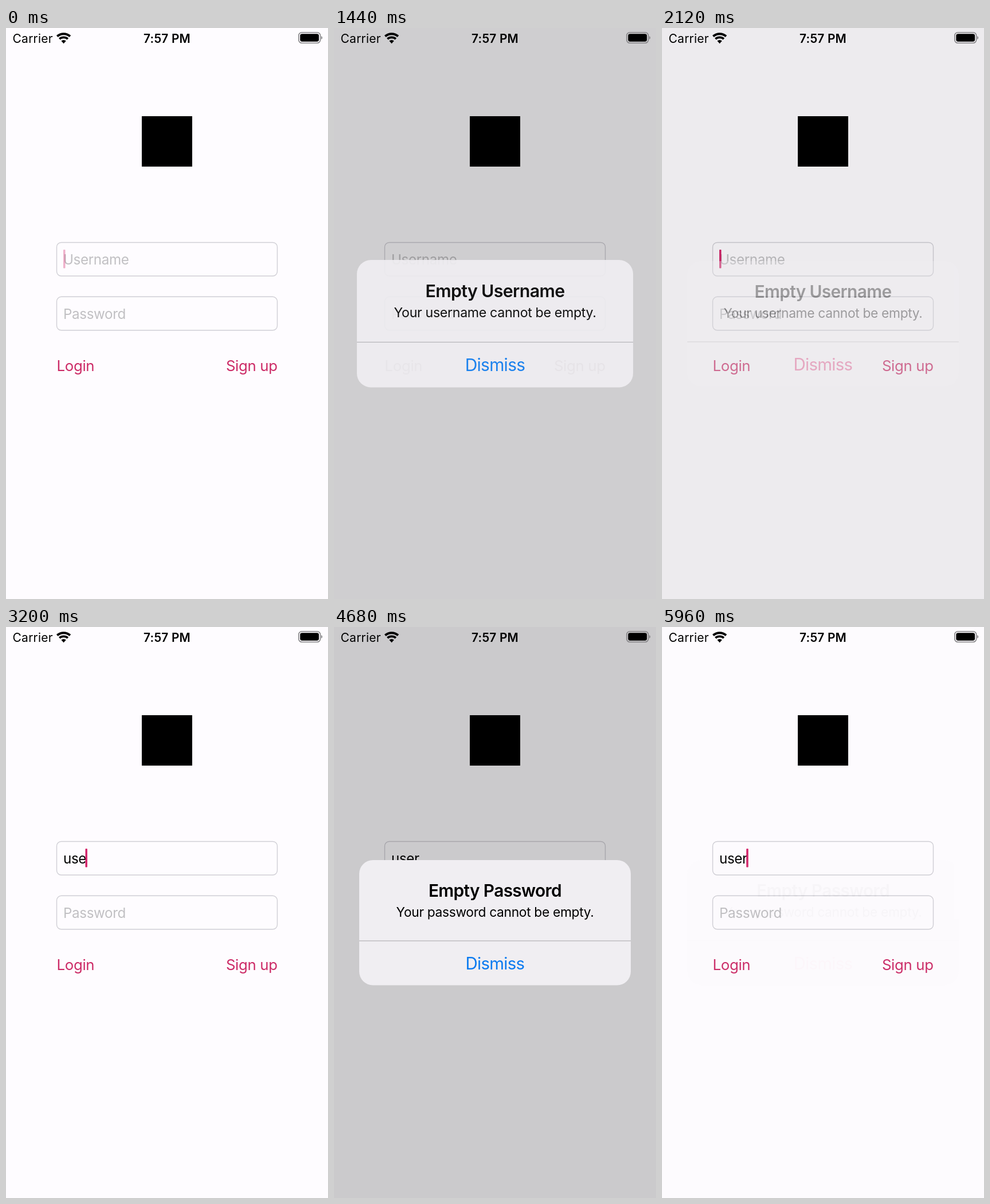
An HTML page that plays this animation: 562x997 px, repeating every 6000 ms.

```html
<!DOCTYPE html>
<html lang="en">
<head>
<meta charset="utf-8">
<title>Login form</title>
<style>
  html, body { margin: 0; width: 100%; height: 100%; overflow: hidden; background: #fefcff; }
  svg { display: block; width: 100%; height: 100%; }
  text { font-family: Inter, Roboto, "Liberation Sans", sans-serif; }
  .status { font-size: 21px; letter-spacing: .25px; }
  .clock { font-size: 20.8px; font-weight: 600; letter-spacing: .2px; }
  .box { fill: none; stroke: #d0cfd5; stroke-width: 1.4; }
  .input { font-size: 24.2px; letter-spacing: -.38px; }
  .button { font-size: 25.8px; letter-spacing: -.35px; }
  .title { font-size: 29.85px; font-weight: 600; letter-spacing: -.65px; }
  .message { font-size: 22.8px; letter-spacing: -.34px; }
  .action { font-size: 29.4px; letter-spacing: -.7px; }
  .mid { text-anchor: middle; }
</style>
</head>
<body>
<svg viewBox="0 0 562 997">
  <rect width="562" height="997" fill="#fefcff"/>
  <rect x="237" y="154" width="88" height="88"/>

  <rect class="box" x="88.5" y="374.5" width="385" height="58.5" rx="8"/>
  <rect class="box" x="88.5" y="469.3" width="385" height="58.5" rx="8"/>
  <text class="input" id="user" x="100" y="412.8"></text>
  <text class="input" x="100" y="507.6" fill="#c1c0c3">Password</text>
  <rect id="cursor" y="387" width="3.5" height="32.5" rx="1" fill="#d4246a"/>
  <text class="button" id="login" x="88.6" y="599.4">Login</text>
  <text class="button" id="signup" x="473.6" y="599.4" text-anchor="end">Sign up</text>

  <rect id="dim" width="562" height="997"/>

  <text class="status" x="11.5" y="25.6">Carrier</text>
  <g id="wifi" transform="translate(100.6 27.2)" fill="none" stroke="#000"></g>
  <text class="clock mid" x="281" y="25.6">7:57 PM</text>
  <rect x="510.8" y="7.8" width="37.8" height="18.4" rx="5.5" fill="none" stroke="#858487" stroke-width="1.6"/>
  <rect x="513.3" y="10.3" width="32.8" height="13.4" rx="3.4"/>
  <path d="M550.2 14 q2 .8 2 3 t-2 3z" fill="#858487"/>

  <g id="alert">
    <rect x="44" y="407" width="474" height="218.6" rx="24" fill="#f0eef2"/>
    <path id="pressed" d="M44 548.5h474v53.1a24 24 0 0 1-24 24h-426a24 24 0 0 1-24-24z" fill-opacity=".08"/>
    <rect x="44" y="547.4" width="474" height="1.2" fill="#b3b2b6"/>
    <text class="title mid" id="title" x="281" y="470.6"></text>
    <text class="message mid" id="message" x="281" y="505.6"></text>
    <text class="action mid" id="action" x="281" y="597.8">Dismiss</text>
  </g>
</svg>
<script>
const LOOP = 6000, STEP = 40;
const PINK = [204, 42, 102], GREY = [153, 153, 153];
const KEYS = [2920, 3080, 3200, 3320];
const ALERTS = [
  { field: 'Username', tap: 1200, open: 1261, press: 1920, close: 2020 },
  { field: 'Password', tap: 4120, open: 4181, press: 5560, close: 5700 }
];
const el = {};
document.querySelectorAll('[id]').forEach(node => el[node.id] = node);
const set = (id, name, value) => el[id].setAttribute(name, value);
const clamp = v => Math.max(0, Math.min(1, v));
const ramp = (t, from, to) => clamp((t - from) / (to - from));

// Critically damped spring from 0 to 1
function spring(t, start) {
  const u = Math.max(0, t - start) * 0.0228;
  return 1 - (1 + u) * Math.exp(-u);
}

function drawWifi() {
  const a = 0.73;
  const arc = (r, extra, close) => {
    const x = r * Math.sin(a), y = -r * Math.cos(a);
    return `<path d="M${-x} ${y}A${r} ${r} 0 0 1 ${x} ${y}${close}" ${extra}/>`;
  };
  el.wifi.innerHTML = arc(17, 'stroke-width="3.9"', '') +
    arc(10.9, 'stroke-width="3.8"', '') +
    arc(6.3, 'fill="#000" stroke="none"', 'L0 0z');
}

function cursorAlpha(t) {
  if (t < 600) return 0.35 * (1 - ramp(t, 0, 80));
  if (t < ALERTS[0].open) return ramp(t, 600, 760);
  if (t < ALERTS[0].close) return 0;
  if (t < KEYS[0]) return 1 - ramp(t, 2520, 2720);
  if (t < ALERTS[1].open) return 1 - ramp(t, 3840, 4040);
  return t < ALERTS[1].close ? 0 : 1;
}

function drawForm(t, alert, shown) {
  const typed = 'user'.slice(0, KEYS.filter(k => t >= k).length);
  el.user.textContent = typed || 'Username';
  set('user', 'fill', typed ? '#000' : '#c1c0c3');
  set('cursor', 'x', typed ? 98.4 + el.user.getComputedTextLength() : 100);
  set('cursor', 'opacity', cursorAlpha(t));

  const tint = t < alert.close ? shown : 0;
  const color = PINK.map((c, i) => Math.round(c + (GREY[i] - c) * tint));
  set('login', 'fill', `rgb(${color})`);
  set('signup', 'fill', `rgb(${color})`);
  set('login', 'opacity', t < alert.tap ? 1 : 0.2 + 0.8 * ramp(t, alert.open, alert.open + 250));
}

function drawAlert(t, alert, shown) {
  const scale = 1.2 - 0.2 * spring(t, alert.open);
  set('dim', 'opacity', 0.2 * shown);
  set('alert', 'opacity', shown);
  set('alert', 'transform', `translate(281 516.3) scale(${scale}) translate(-281 -516.3)`);
  el.title.textContent = 'Empty ' + alert.field;
  el.message.textContent = `Your ${alert.field.toLowerCase()} cannot be empty.`;
  set('pressed', 'opacity', t >= alert.press && t < alert.close ? 1 : 0);
  set('action', 'fill', t < alert.press ? '#0a7af0' : '#d8266a');
}

function draw(time) {
  const t = Math.floor(time % LOOP / STEP) * STEP;
  const alert = ALERTS[t < KEYS[0] ? 0 : 1];
  const shown = spring(t, alert.open) * (1 - spring(t, alert.close));
  drawForm(t, alert, shown);
  drawAlert(t, alert, shown);
}

drawWifi();
const begin = performance.now();
function tick() {
  draw(performance.now() - begin);
  requestAnimationFrame(tick);
}
tick();
</script>
</body>
</html>
```
